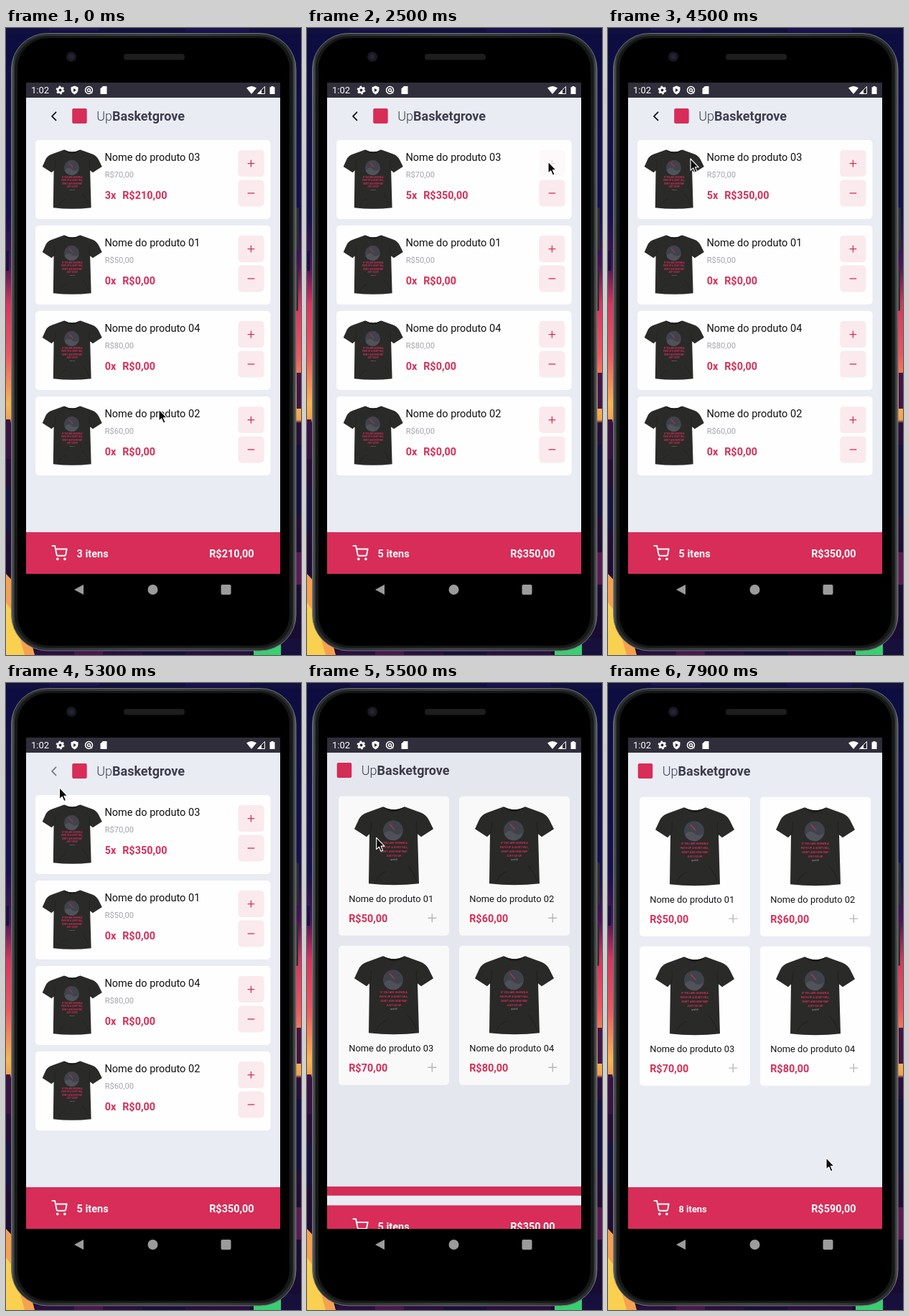
Animation of 411x873 px, one loop 8000 ms. Source, as an HTML page:

```html
<!DOCTYPE html>
<html lang="pt-BR">
<head>
<meta charset="utf-8">
<title>Carrinho</title>
<style>
  html, body { margin: 0; width: 100%; height: 100%; overflow: hidden; background: #100e3a; }
  svg { display: block; width: 100vw; height: 100vh; font-family: Roboto, sans-serif; }
  .b { font-weight: 700; }
  .pink { fill: #d62f58; }
</style>
</head>
<body>
<svg id="stage" viewBox="0 0 411 873" xmlns="http://www.w3.org/2000/svg"></svg>
<script>
const LOOP = 8000, STEP = 100;
const TOP = 97, BOTTOM = 760, HEIGHT = BOTTOM - TOP;
const PINK = '#d72d58', PAGE = '#eaecf4';

const rect = (x, y, w, h, fill, r = 0, more = '') =>
  `<rect x="${x}" y="${y}" width="${w}" height="${h}" rx="${r}" fill="${fill}" ${more}/>`;
const text = (x, y, size, str, more = '') =>
  `<text x="${x}" y="${y}" font-size="${size}" ${more}>${str}</text>`;
const line = (d, color, width, more = '') =>
  `<path d="${d}" fill="none" stroke="${color}" stroke-width="${width}" ${more}/>`;
const shirt = (x, y, s) => `<use href="#shirt" transform="translate(${x} ${y}) scale(${s})"/>`;

const defs = `<defs>
  <linearGradient id="sky" x1="0" y1="0" x2="0" y2="1">
    <stop offset="0" stop-color="#0d0d40"/><stop offset=".3" stop-color="#161050"/>
    <stop offset=".38" stop-color="#4a1656"/><stop offset=".44" stop-color="#d8345f"/>
    <stop offset=".52" stop-color="#ee5560"/><stop offset=".6" stop-color="#f9b650"/>
    <stop offset=".625" stop-color="#f3a052"/><stop offset=".63" stop-color="#2a0f3c"/>
    <stop offset="1" stop-color="#170b30"/>
  </linearGradient>
  <linearGradient id="edge" x1="0" x2="1" y1="0" y2="0">
    <stop offset="0" stop-color="#5d6261"/><stop offset=".012" stop-color="#2a2d2d"/>
    <stop offset=".5" stop-color="#3c4040"/>
    <stop offset=".988" stop-color="#2a2d2d"/><stop offset="1" stop-color="#5d6261"/>
  </linearGradient>
  <clipPath id="screen">${rect(28, TOP, 354, HEIGHT, '#000')}</clipPath>
  <clipPath id="reveal"><rect id="revealBox" x="28" y="${TOP}" width="354" height="${HEIGHT}"/></clipPath>
  <g id="shirt">
    <path d="M40 0Q55 8 70 0L92 8Q100 11 104 19L110 31L93 42L88 38L90 107Q55 111 20 107L21 38L17 42L0 31L6 18Q9 11 18 8Z" fill="#2a2a29"/>
    <path d="M40 0Q55 8 70 0L68 2Q55 12 42 2Z" fill="#1b1b1b"/>
    <path d="M21 38Q25 28 23 20M88 38Q85 28 87 20M74 82Q82 90 86 102M30 104Q34 94 44 90" fill="none" stroke="#222221" stroke-width="1.3"/>
    <circle cx="54" cy="33" r="14" fill="#41434c"/>
    <path d="M41 38Q48 30 54 36T67 35Q64 47 54 47Q44 46 41 38Z" fill="#51535b"/>
    <path d="M49 24L56 32" stroke="#a83a50" stroke-width="1.4"/>
    <g class="pink b" text-anchor="middle" font-size="3.8">
      ${['IF YOU ARE SHOWN A', 'PATH UP A QUIET HILL,', "DON'T ASK HOW FAR!", 'JUST GO UP.']
        .map((s, i) => text(55, 51.8 + i * 6, 3.8, s)).join('')}
    </g>
    ${text(55, 75, 2.6, 'quiet hill', 'fill="#aaa" text-anchor="middle"')}
  </g>
</defs>`;

const backdrop = rect(0, 0, 411, 873, 'url(#sky)') +
  rect(0, 0, 411, 8, '#12103f') +
  rect(60, 0, 70, 4, '#1c1450') + rect(250, 0, 90, 5, '#1a1250') +
  rect(0, 310, 4, 28, '#1a1046') + rect(0, 545, 6, 55, '#3a1246') +
  rect(0, 640, 5, 60, '#101546') +
  `<path d="M0 760L14 775L40 873H0Z" fill="#f7a14e"/><path d="M0 800L9 812L26 873H0Z" fill="#f9d04f"/>` +
  rect(405, 480, 6, 50, '#451447') + rect(404, 580, 7, 100, '#141040') +
  rect(404, 730, 7, 45, '#5a1a55') + rect(40, 867, 300, 6, '#2a0f42') +
  rect(95, 868, 40, 5, '#4b1750') + rect(190, 869, 60, 4, '#15103a') +
  rect(345, 856, 38, 17, '#37cf72') + rect(383, 850, 28, 23, '#17103c');

const phone = rect(402, 250, 6, 60, '#2b2e2e', 2) + rect(402, 336, 5, 58, '#2b2e2e', 2) +
  rect(7.5, 7.5, 396.5, 859.5, 'url(#edge)', 50, 'stroke="#717675"') +
  rect(12, 11, 387.5, 852, '#161818', 46) + rect(16, 14, 379, 846, '#000', 43) +
  rect(164, 36, 85, 8.5, '#1d1d1d', 4) +
  `<circle cx="91" cy="40" r="7" fill="#1a1a1e"/><circle cx="91" cy="40" r="3.5" fill="#22243c"/>` +
  `<path d="M108 775V789L95 782Z" fill="#9b9b9b"/><circle cx="204.5" cy="782" r="7" fill="#9b9b9b"/>` +
  rect(299.5, 775, 14, 14, '#9b9b9b', 2);

const status = rect(28, 76, 354, 21, '#2f2e3a') +
  text(35, 91.2, 13, '1:02', 'fill="#fff"') +
  `<g fill="#fff">
    <circle cx="75.5" cy="86.5" r="3.3" fill="none" stroke="#fff" stroke-width="2.6"/>
    <circle cx="75.5" cy="86.5" r="5" fill="none" stroke="#fff" stroke-width="1.8" stroke-dasharray="2.6 2.64"/>
    <path d="M95.5 80.5L100.5 82.5V86Q100 90.5 95.5 92.5Q91 90.5 90.5 86V82.5Z"/>
    <path d="M94 84L98 86.5L94 89Z" fill="#2f2e3a"/>
    <circle cx="115.5" cy="86.5" r="5" fill="none" stroke="#fff" stroke-width="1.5"/>
    <circle cx="115.5" cy="86.5" r="2" fill="none" stroke="#fff" stroke-width="1.4"/>
    <path d="M117 88L120 91" stroke="#fff" stroke-width="1.3"/>
    <path d="M135 81H140.5V92H131.5V84.5Z"/>
    <path d="M335 83.5Q342 78.5 349 83.5L342 92Z"/>
    <path d="M360.5 81.5V91.5H350.5Z" fill="none" stroke="#fff"/><path d="M356 86V92H350Z"/>
    <path d="M369.5 81H372.5V82.2H374.5V92H367.5V82.2H369.5Z"/>
  </g>`;

// Plain square stands for the shop mark.
const header = x => rect(x, 112, 20.5, 21, PINK, 2) +
  text(x + 34, 129, 18, '<tspan font-weight="300">Up</tspan><tspan class="b">Basketgrove</tspan>', 'fill="#3d3d4d"');

const footer = (id, size) => rect(28, 702, 354, 58, PINK) +
  `<g transform="translate(63.5 720) scale(.92)" fill="none" stroke="#fff" stroke-width="2" stroke-linecap="round" stroke-linejoin="round">
    <circle cx="9" cy="21" r="1"/><circle cx="20" cy="21" r="1"/>
    <path d="M1 1h4l2.68 13.39a2 2 0 0 0 2 1.61h9.72a2 2 0 0 0 2-1.61L23 6H6"/></g>` +
  text(98.5, 737, size, '', `id="${id}Items" class="b" fill="#fff"`) +
  text(283.2, 737, 14.4, '', `id="${id}Total" class="b" fill="#fff"`);

function homeCard(n) {
  const x = n % 2 ? 44 : 212, y = n < 3 ? 158.7 : 366.7;
  return rect(x, y, 154, 194, '#fefefe', 5) + shirt(x + 22, y + 14.5, 1) +
    text(x + 14.2, y + 147.3, 12.9, `Nome do produto 0${n}`, 'fill="#17171c"') +
    text(x + 14.2, y + 175.5, 14.4, `R$${40 + n * 10},00`, 'class="b pink"') +
    line(`M${x + 124.3} ${y + 169.4}h12m-6 -6v12`, '#b9b9be', 1.4, n === 4 ? 'id="homePlus"' : '');
}

function cartRow(n, i) {
  const y = 156 + i * 119, first = i === 0;
  const id = name => first ? `id="${name}"` : '';
  return rect(41, y, 327.5, 110, '#fefefe', 5) + shirt(50.7, y + 13.5, .755) +
    text(137.5, y + 29.3, 14.5, `Nome do produto 0${n}`, 'fill="#111"') +
    text(137.7, y + 51.5, 11.1, `R$${40 + n * 10},00`, 'fill="#a3a3ab"') +
    text(137.7, y + 82, 14.4, '0x', `class="b pink" ${id('rowCount')}`) +
    text(162.2, y + 82, 14.4, 'R$0,00', `class="b pink" ${id('rowTotal')}`) +
    `<g ${id('cartPlus')}>${rect(323.3, y + 14, 36.2, 37, '#faeaed', 5)}` +
    line(`M336.6 ${y + 32.6}h9.6m-4.8 -4.8v9.6`, PINK, 1.3) + '</g>' +
    rect(323.3, y + 55.5, 36.2, 37, '#faeaed', 5) +
    line(`M336.6 ${y + 74}h9.6`, PINK, 1.3);
}

document.getElementById('stage').innerHTML = defs + backdrop + phone +
  `<g clip-path="url(#screen)">
    ${rect(28, TOP, 354, HEIGHT, PAGE)}
    <g id="home">${rect(28, TOP, 354, HEIGHT, PAGE)}${header(41.7)}${[1, 2, 3, 4].map(homeCard).join('')}${footer('home', 12.9)}</g>
    ${rect(28, TOP, 354, HEIGHT, '#000', 0, 'id="shade"')}
    <g clip-path="url(#reveal)"><g id="cart">${rect(28, TOP, 354, HEIGHT, PAGE)}
      ${line('M69.5 117.3L64 122.8L69.5 128.3', '#111', 1.8, 'id="back" stroke-linecap="round" stroke-linejoin="round"')}
      ${header(92.2)}${[3, 1, 4, 2].map(cartRow).join('')}${footer('cart', 14.5)}</g></g>
  </g>` + status +
  `<path id="cursor" d="M0 0V16.2L3.7 12.8L6.3 19L9 17.9L6.4 11.8H11.3Z" fill="#0a0a0a" stroke="#fff" stroke-width="1.1" stroke-linejoin="round"/>`;

const el = {};
document.querySelectorAll('#stage [id]').forEach(e => el[e.id] = e);

// Pointer way points: time, x, y.
const PATH = [
  [200, 213, 531], [300, 241, 499], [400, 271, 459], [500, 271, 459], [700, 297, 345],
  [900, 329, 216], [1000, 329, 216], [1200, 332, 192], [1300, 335, 187], [1400, 335, 187],
  [1500, 336, 186], [2700, 336, 186], [2900, 306, 330], [3100, 205, 700], [3200, 168, 777],
  [3300, 158, 758], [3500, 136, 743], [4000, 136, 743], [4100, 128, 661], [4200, 128, 661],
  [4300, 162, 480], [4500, 115, 182], [4800, 65, 120], [5200, 65, 120], [5400, 84, 171],
  [5700, 122, 304], [5800, 122, 304], [5900, 208, 493], [6000, 208, 493], [6100, 313, 544],
  [6400, 342, 540], [6500, 342, 540], [6600, 344, 537], [7500, 344, 537], [7900, 304, 661]
];
const CART_TAPS = [[1400, 1700], [2100, 2500]];
const HOME_TAPS = [[6500, 6600], [6800, 7000], [7300, 7500]];
const BACK_TAPS = [[4900, 5200]];

function pointer(t) {
  const i = PATH.findIndex(p => p[0] >= t);
  if (i === 0) return PATH[0].slice(1);
  if (i < 0) return PATH[PATH.length - 1].slice(1);
  const [t0, x0, y0] = PATH[i - 1], [t1, x1, y1] = PATH[i];
  const k = (t - t0) / (t1 - t0);
  return [x0 + (x1 - x0) * k, y0 + (y1 - y0) * k];
}

function tapOpacity(t, taps) {
  const tap = taps.filter(([down]) => t >= down).pop();
  if (!tap) return 1;
  const [down, up] = tap;
  return t < up ? Math.max(.2, 1 - .8 * (t - down) / 100) : Math.min(1, .2 + .8 * (t - up) / 250);
}

const released = (t, taps) => taps.filter(tap => t >= tap[1]).length;

// cubic-bezier(.20833, .82, .25, 1)
function ease(x) {
  if (x <= 0) return 0;
  if (x >= 1) return 1;
  const curve = (s, a, b) => 3 * (1 - s) ** 2 * s * a + 3 * (1 - s) * s * s * b + s ** 3;
  let lo = 0, hi = 1;
  for (let i = 0; i < 24; i++) {
    const mid = (lo + hi) / 2;
    if (curve(mid, .20833, .25) < x) lo = mid; else hi = mid;
  }
  return curve(lo, .82, 1);
}

function draw(t) {
  const inCart = 3 + released(t, CART_TAPS), added = released(t, HOME_TAPS);
  const items = `${inCart + added} itens`, total = `R$${inCart * 70 + added * 80},00`;
  el.rowCount.textContent = `${inCart}x`;
  el.rowTotal.textContent = `R$${inCart * 70},00`;
  el.homeItems.textContent = el.cartItems.textContent = items;
  el.homeTotal.textContent = el.cartTotal.textContent = total;

  el.cartPlus.setAttribute('opacity', tapOpacity(t, CART_TAPS));
  el.homePlus.setAttribute('opacity', tapOpacity(t, HOME_TAPS));
  el.back.setAttribute('opacity', tapOpacity(t, BACK_TAPS));

  const gone = ease((t - 5300) / 425), left = 1 - gone;
  el.revealBox.setAttribute('y', TOP + HEIGHT * gone);
  el.cart.setAttribute('transform', `translate(0 ${HEIGHT * .041 * gone})`);
  el.home.setAttribute('transform', `translate(0 ${-HEIGHT * .02 * left})`);
  el.shade.setAttribute('opacity', .1 * Math.min(1, left / .36));

  el.cursor.setAttribute('transform', `translate(${pointer(t).join(' ')})`);
}

const start = performance.now();
function tick() {
  const t = (performance.now() - start) % LOOP;
  draw(Math.floor(t / STEP) * STEP);
  requestAnimationFrame(tick);
}
tick();
</script>
</body>
</html>
```
